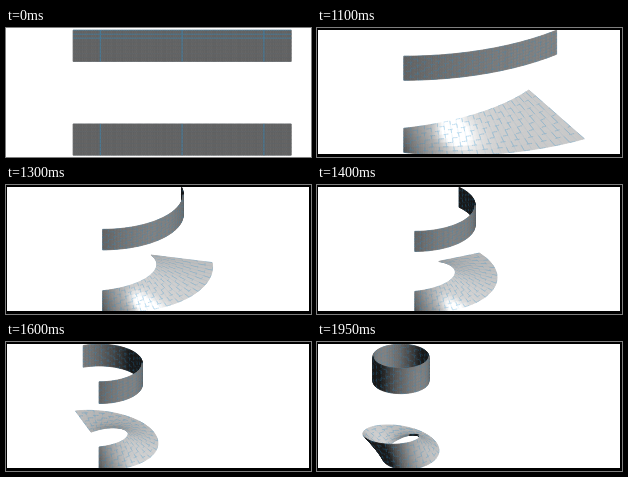
Write an HTML page with a canvas that moves like this. It is 305 px wide and 129 px high and loops after 2.95 s.

```html
<!DOCTYPE html>
<html lang="en">
<head>
<meta charset="utf-8">
<title>Cylinder and Möbius band</title>
<style>
  html, body { margin: 0; width: 100%; height: 100%; overflow: hidden; background: #fff; }
  canvas { display: block; width: 305px; height: 129px; }
</style>
</head>
<body>
<canvas id="stage"></canvas>
<script>
const W = 305, H = 129, DENSITY = window.devicePixelRatio || 1;
const COLS = 96, ROWS = 8, MESH = 4;      // a mesh line on every fourth column
const SIN = 0.436, COS = 0.9;             // camera tilt
const LIGHT = [0.4, -0.4, 0.82], GLEAM = [0.22, -0.7, 0.68];
const LOOP = 2950, START = 1000, STEP = 50, STEPS = 20;

const canvas = document.getElementById('stage');
canvas.width = W * DENSITY;
canvas.height = H * DENSITY;
const ctx = canvas.getContext('2d');

// Point of a band in space: x to the right, d into depth, z up.
function bandPoint(i, j, step, twisted) {
  const a = i / COLS, v = j / ROWS - 0.5, base = twisted ? -3 : 0;
  if (step === 0) return { x: a * 2 * Math.PI, d: 0, z: base - v };
  const bend = Math.tan(step / STEPS * Math.PI / 4);
  const radius = 1 / bend, angle = a * 2 * Math.PI * bend;
  const twist = twisted ? angle / 2 : 0;
  const r = radius * (1 + v * Math.sin(twist));
  return { x: r * Math.sin(angle), d: radius - r * Math.cos(angle), z: base - v * Math.cos(twist) };
}

const dot = (p, q) => p[0] * q[0] + p[1] * q[1] + p[2] * q[2];

// Unit normal from the diagonals of a quad, turned toward the viewer.
function normal([a, b, c, e]) {
  const p = [c.x - a.x, c.d - a.d, c.z - a.z], q = [e.x - b.x, e.d - b.d, e.z - b.z];
  const n = [p[1] * q[2] - p[2] * q[1], p[2] * q[0] - p[0] * q[2], p[0] * q[1] - p[1] * q[0]];
  const length = Math.hypot(...n) * (dot(n, [0, -COS, SIN]) < 0 ? -1 : 1) || 1;
  return n.map(k => k / length);
}

function shade(n) {
  const diffuse = Math.max(0, dot(n, LIGHT)), gleam = Math.max(0, dot(n, GLEAM)) ** 60;
  return Math.min(1, 0.1 + 0.72 * diffuse + 0.4 * gleam);
}

function buildBand(step, twisted) {
  const grid = [];
  for (let i = 0; i <= COLS; i++) {
    grid.push([]);
    for (let j = 0; j <= ROWS; j++) {
      const p = bandPoint(i, j, step, twisted);
      p.y = -COS * p.z - SIN * p.d;
      p.far = COS * p.d - SIN * p.z;
      grid[i].push(p);
    }
  }
  const quads = [];
  for (let i = 0; i < COLS; i++) {
    for (let j = 0; j < ROWS; j++) {
      const corners = [grid[i][j], grid[i][j + 1], grid[i + 1][j + 1], grid[i + 1][j]];
      quads.push({
        i, j, corners, twisted,
        light: shade(normal(corners)),
        far: corners.reduce((sum, p) => sum + p.far, 0)
      });
    }
  }
  return quads.sort((a, b) => b.far - a.far);
}

function line(a, b, alpha, place) {
  if (!alpha) return;
  ctx.strokeStyle = `rgba(45,145,205,${alpha})`;
  ctx.lineWidth = 0.7;
  ctx.beginPath();
  ctx.moveTo(...place(a));
  ctx.lineTo(...place(b));
  ctx.stroke();
}

// Strength of the mesh line along column i beside row j.
function columnAlpha(i, j, flat) {
  if (i % MESH) return 0;
  if (flat) return i / MESH % 9 === 3 ? 0.7 : 0;
  return (i / MESH + j) % 2 ? 0.4 : 0.1;
}

// Strength of the mesh line along row j beside column i; dashes are staggered.
function rowAlpha(i, j, flat, twisted) {
  if (flat) return !twisted && j < 3 ? 0.6 : 0.05;
  return (i + 3 * j) % 8 < 3 ? 0.4 : 0;
}

function drawQuad({ i, j, corners, twisted, light }, flat, place) {
  const level = Math.round(light * 255);
  ctx.fillStyle = ctx.strokeStyle = `rgb(${level},${level},${level})`;
  ctx.lineWidth = 0.8;
  ctx.beginPath();
  corners.forEach(p => ctx.lineTo(...place(p)));
  ctx.closePath();
  ctx.fill();
  ctx.stroke();

  const [a, b, c, e] = corners;
  line(a, b, columnAlpha(i, j, flat), place);
  line(e, c, columnAlpha(i + 1, j, flat), place);
  line(a, e, rowAlpha(i, j, flat, twisted), place);
  line(b, c, rowAlpha(i, j + 1, flat, twisted), place);
}

function draw(step) {
  ctx.setTransform(DENSITY, 0, 0, DENSITY, 0, 0);
  ctx.lineJoin = 'round';
  ctx.fillStyle = '#fff';
  ctx.fillRect(0, 0, W, H);

  // Both bands together fill the height of the stage.
  const bands = [buildBand(step, false), buildBand(step, true)];
  const heights = bands.flat().flatMap(q => q.corners.map(p => p.y));
  const top = Math.min(...heights), scale = 125 / (Math.max(...heights) - top);
  const place = p => [152.5 + (p.x - 2.46) * scale, 2.2 + (p.y - top) * scale];
  bands.forEach(band => band.forEach(quad => drawQuad(quad, step === 0, place)));

  if (step > 1) {
    ctx.fillStyle = '#000';
    ctx.fillRect(0, 0, W, 2);
    ctx.fillRect(0, H - 3, W, 3);
    ctx.fillRect(0, 0, 1, H);
    ctx.fillRect(W - 2, 0, 2, H);
  }
}

let shown = -1;
function tick() {
  const time = performance.now() % LOOP;
  const step = time < START ? 0 : Math.min(STEPS, Math.floor((time - START) / STEP) + 1);
  if (step !== shown) draw(shown = step);
  requestAnimationFrame(tick);
}
tick();
</script>
</body>
</html>
```
